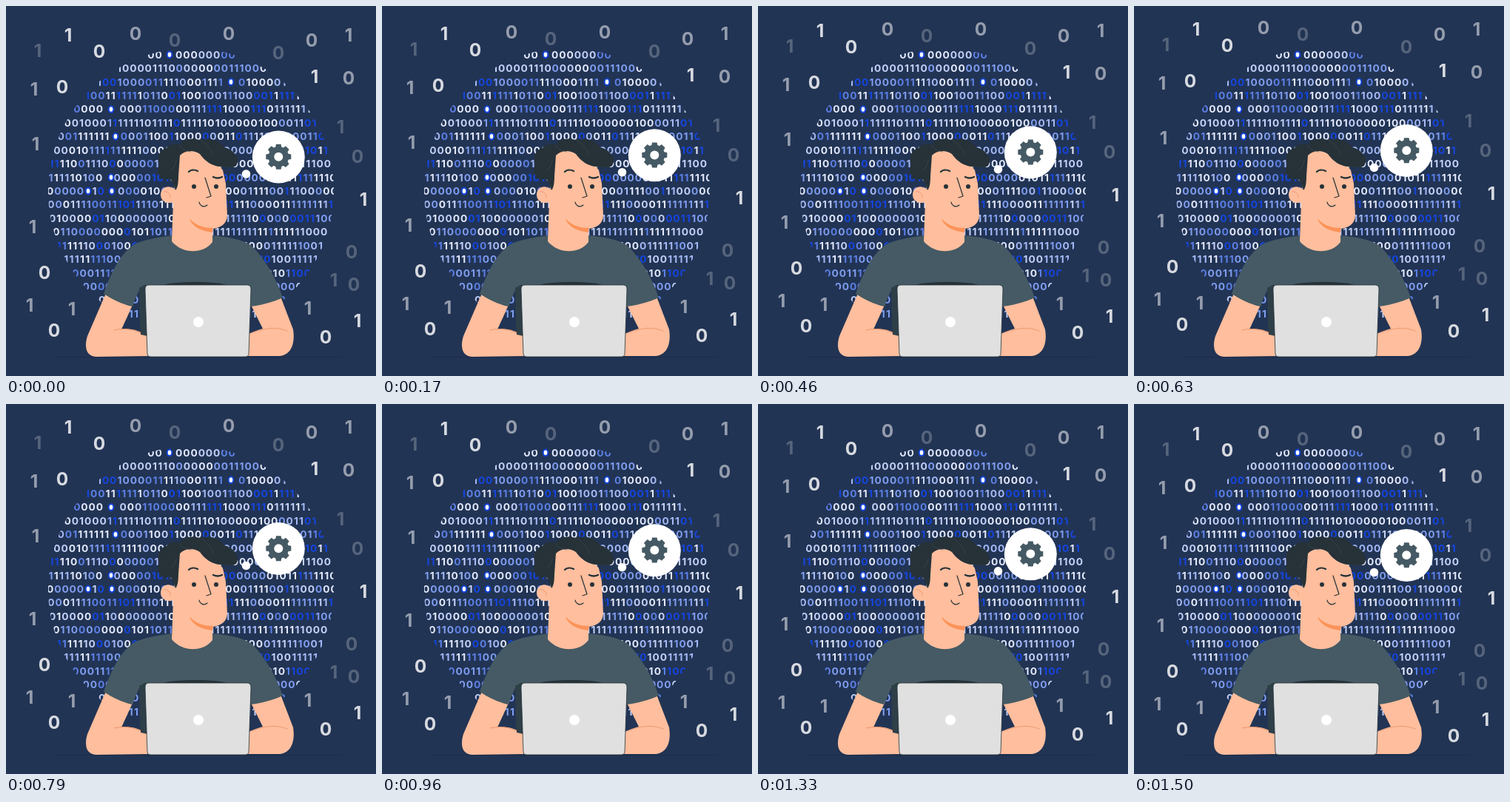
An HTML page for the animation above (1540 ms loop, 500 by 500 pixels).

```html
<!DOCTYPE html>
<html lang="en">
<head>
<meta charset="utf-8">
<title>Binary thinker</title>
<style>
  html, body { margin: 0; width: 100%; height: 100%; overflow: hidden; background: #223454; }
  svg { display: block; width: 100%; height: 100%; }
  text { font-family: Inter, sans-serif; font-weight: 700; text-anchor: middle; }
  #field text { font-size: 13.8px; }
  #loose text { font-size: 24.5px; fill: #fff; }
  .ink { fill: none; stroke: #263238; stroke-linecap: round; stroke-linejoin: round; }
  .crease { fill: none; stroke: #eb996e; stroke-linecap: round; }
</style>
</head>
<body>
<svg viewBox="0 0 500 500">
  <clipPath id="disc"><circle cx="250" cy="250" r="193"/></clipPath>
  <rect width="500" height="500" fill="#223454"/>
  <g id="field" clip-path="url(#disc)"></g>

  <g id="person">
    <path stroke="#1d2b46" d="M68 474.5H452"/>
    <!-- arms -->
    <path fill="#ffbe9d" d="M136 386L110 446C106 459 107 473 122 474L194 473L192 446C180 438 168 435 156 437L172 402Z"/>
    <path class="crease" d="M146 438C162 434 178 438 191 446"/>
    <path fill="#ffbe9d" d="M330 402L347 436C340 438 334 440 328 443L327 473H369C386 472 391 455 388 437L370 390Z"/>
    <path class="crease" d="M332 442C348 435 366 433 380 439"/>
    <!-- shirt -->
    <path fill="#455a64" d="M224 310C205 313 184 316 172 323C152 337 141 364 132 389C143 396 157 403 170 406L181 382L182 444H326L331 406C346 404 361 400 374 394C366 370 351 343 333 325C321 315 298 312 279 310Z"/>
    <path fill="#2f3f47" d="M180 381L189 376L191 446L182 444Z"/>
    <path fill="#263238" d="M210 378C222 372 288 371 300 378Z"/>
    <!-- head -->
    <path fill="#ffbe9d" d="M231 202C246 184 282 203 293 222L297 240L299 283C299 294 290 300 279 301L279 319C267 335 239 336 224 318L226 264Z"/>
    <path fill="#fb9359" d="M248 287C256 297 268 300 280 300L279 306C263 304 251 298 248 287Z"/>
    <path fill="#ffbe9d" d="M228 248C221 241 209 244 209 255C209 264 217 268 227 265Z"/>
    <path class="crease" d="M214 251C219 250 222 254 222 259"/>
    <path fill="#263238" d="M212 234C204 229 204 220 207 214C203 205 208 193 217 192C220 187 228 185 234 188C239 179 253 178 262 181C278 176 291 184 295 191C307 194 318 206 311 216C304 220 296 217 290 217C279 217 268 209 262 200C254 195 243 194 235 202L233 230C233 239 232 246 229 249C227 242 225 236 221 233C218 235 215 235 212 234Z"/>
    <path fill="none" stroke="#3b4a52" stroke-width=".7" d="M235 188C236 193 243 196 250 197M262 181C270 185 276 193 280 202M223 221C228 218 230 213 230 208"/>
    <path class="ink" stroke-width="2.4" d="M247 224C250 221 255 221 259 223M280 231C284 233 288 233 292 231"/>
    <path class="ink" stroke-width="1.2" d="M269 232L277 257L271 259M261 265C262 270 267 273 272 269"/>
    <circle cx="254" cy="244" r="3" fill="#263238"/>
    <circle cx="284" cy="244" r="3" fill="#263238"/>
    <!-- laptop -->
    <path fill="#e0e0e0" stroke="#263238" stroke-width=".8" d="M193 377H326Q331 377 331 383L328 470Q328 474 323 474H195Q191 474 191 470L188 383Q188 377 193 377Z"/>
    <circle cx="260" cy="427" r="7" fill="#fff"/>
  </g>

  <g id="drift">
    <g id="loose"></g>
    <circle cx="368.3" cy="204" r="35.5" fill="#fff"/>
    <circle cx="324.5" cy="227" r="5.8" fill="#fff"/>
    <g id="gear" transform="translate(368.3 203.7)" fill="#455a64"></g>
  </g>
</svg>
<script>
const $ = id => document.getElementById(id);
function add(parent, tag, attrs, text = '') {
  const el = document.createElementNS('http://www.w3.org/2000/svg', tag);
  for (const k in attrs) el.setAttribute(k, attrs[k]);
  el.textContent = text;
  return parent.appendChild(el);
}

let seed = 41;
const rand = () => (seed = (seed * 16807) % 2147483647) / 2147483647;
const pick = list => list[Math.floor(rand() * list.length)];

// Rows of random digits, each as wide as the disc at its height.
const CENTER = 250, RADIUS = 193, ROWS = 21, PITCH = 18.42;
const ADVANCE = { 0: 10.2, 1: 7.2 };
const tones = ['#e3e9fd', '#c3d0fa', '#a4b9f6', '#e3e9fd', '#7f9df0', '#5c80e6', '#1546e0'];
const glows = [[0, 221], [2, 304], [4, 142], [6, 148], [9, 142], [10, 111], [10, 143]];

for (let row = 0; row < ROWS; row++) {
  const cy = CENTER + (row - (ROWS - 1) / 2) * PITCH;
  const half = Math.sqrt(RADIUS ** 2 - (cy - CENTER) ** 2);
  const lit = glows.filter(g => g[0] === row).map(g => g[1]);
  let tone = pick(tones), digit = 0;
  for (let x = CENTER - half - rand() * 4; x < CENTER + half;) {
    if (rand() < .55) tone = pick(tones);
    if (rand() < .6) digit = rand() < .52 ? 0 : 1;
    const w = ADVANCE[digit], cx = x + w / 2;
    x += w;
    if (lit.some(g => Math.abs(g - cx) < 8)) continue;
    add($('field'), 'text', { x: cx, y: cy + 5, fill: tone }, digit);
  }
  for (const cx of lit)
    add($('field'), 'ellipse', { cx, cy, rx: 3.3, ry: 4.3, fill: '#fff', stroke: '#1244dc', 'stroke-width': 2 });
}

// Loose digits around the disc, by brightness: [x, y] of ones, then of zeros.
const loose = {
  .82: [[[84, 39], [483, 261], [475, 425], [417, 95]],
        [[126, 61], [76, 109], [52, 360], [65, 438], [432, 447]]],
  .52: [[[38, 112], [40, 186], [36, 298], [32, 404], [89, 409], [463, 39], [408, 408]],
        [[175, 37], [301, 37], [413, 46], [463, 97]]],
  .24: [[[43, 60], [452, 163], [443, 370]],
        [[228, 46], [368, 63], [475, 203], [467, 332], [470, 376]]]
};
for (const [opacity, [ones, zeros]] of Object.entries(loose))
  for (const [digit, spots] of [[1, ones], [0, zeros]])
    for (const [x, y] of spots)
      add($('loose'), 'text', { x, y: y + 9.2, 'fill-opacity': opacity }, digit);

for (let a = 0; a < 360; a += 45)
  add($('gear'), 'path', { d: 'M-4.4-11L-3.3-17H3.3L4.4-11Z', transform: `rotate(${a})` });
add($('gear'), 'circle', { r: 13.8 });
add($('gear'), 'circle', { r: 6, fill: '#fff' });

// Linear bob at 24 steps per second, highest at step 17.
const LOOP = 1540, STEPS = 37, PEAK = 17, RISE = .57;
const start = performance.now();
function draw() {
  const t = (performance.now() - start) % LOOP;
  const step = Math.floor(t / LOOP * STEPS + .1) % STEPS;
  const away = Math.abs((step - PEAK + STEPS * 1.5) % STEPS - STEPS / 2);
  $('drift').setAttribute('transform', `translate(0 ${(RISE * (away - PEAK)).toFixed(2)})`);
  requestAnimationFrame(draw);
}
draw();
</script>
</body>
</html>
```
